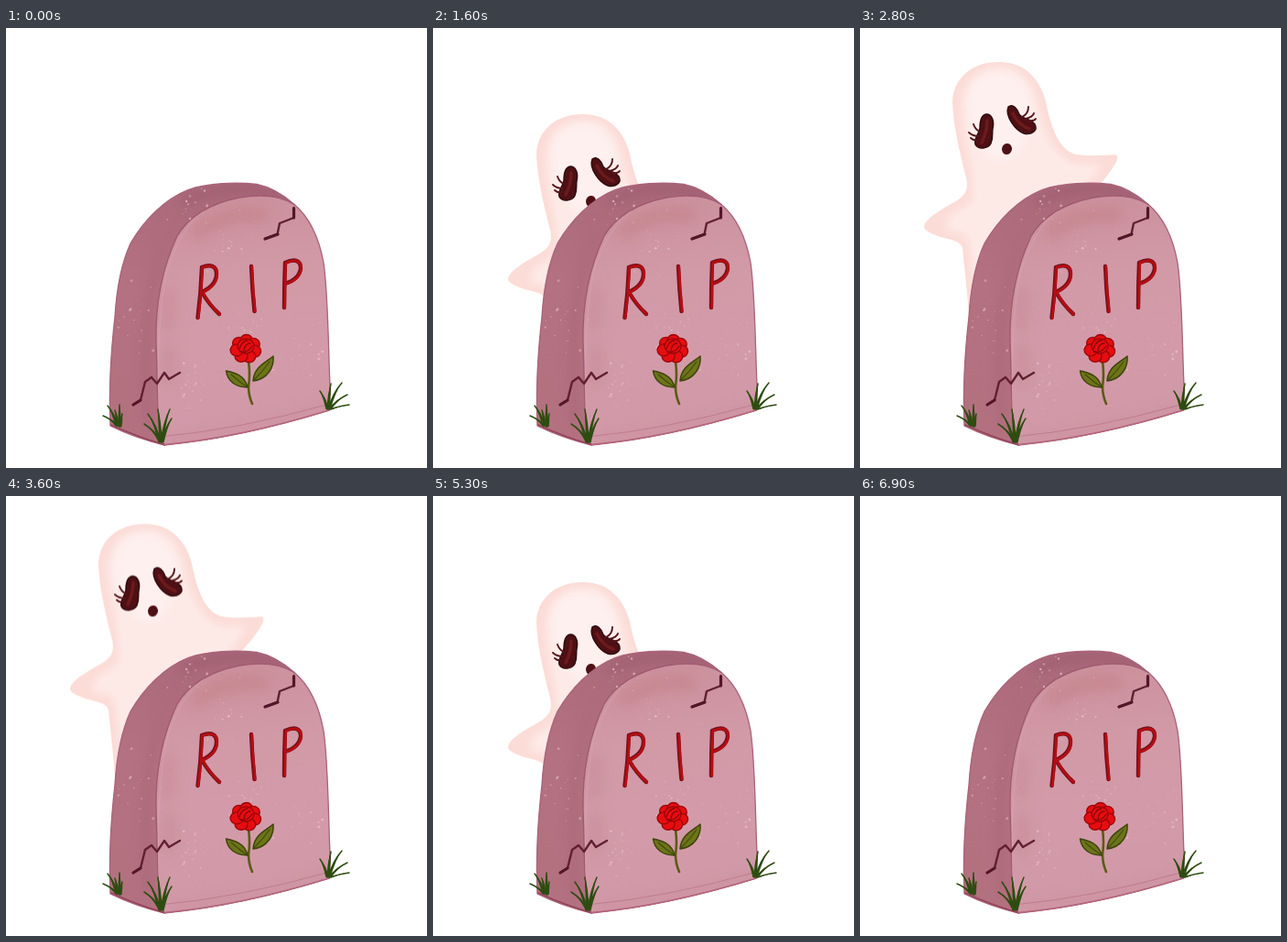
Animation, 460 px wide and 480 px high, one loop 7000 ms. Source, as an HTML page with a canvas:

```html
<!DOCTYPE html>
<html lang="en">
<head>
<meta charset="utf-8">
<title>Shy ghost</title>
<style>
  html, body { margin: 0; width: 100%; height: 100%; overflow: hidden; background: #fff; }
  canvas { display: block; }
</style>
</head>
<body>
<canvas id="stage" width="460" height="480"></canvas>
<script>
const W = 460, H = 480, STEP = 100, STEPS = 70;
const ctx = document.getElementById('stage').getContext('2d');

// Step, left arm tip x, head top y on the way up; the way down mirrors it.
const RISE = [
  [0, 126, 200], [3, 111, 160], [6, 101, 138.5], [8, 96, 129.5], [14, 86, 104],
  [16, 82, 94], [22, 70, 67], [28, 70, 37], [30, 70, 32], [32, 70, 30.5], [34, 70, 30]
];

function layer(draw) {
  const c = document.createElement('canvas');
  c.width = W;
  c.height = H;
  const g = c.getContext('2d');
  g.lineCap = g.lineJoin = 'round';
  draw(g);
  return c;
}

function fill(g, d, color) {
  g.fillStyle = color;
  g.fill(new Path2D(d));
}

function line(g, d, color, width) {
  g.strokeStyle = color;
  g.lineWidth = width;
  g.stroke(new Path2D(d));
}

function gradient(g, x0, y0, x1, y1, ...colors) {
  const grad = g.createLinearGradient(x0, y0, x1, y1);
  colors.forEach((c, i) => grad.addColorStop(i / (colors.length - 1), c));
  return grad;
}

// Draws inside a shape with soft edges.
function soft(g, shape, blur, draw) {
  g.save();
  g.clip(new Path2D(shape));
  g.filter = `blur(${blur}px)`;
  draw();
  g.restore();
}

function random(seed) {
  return () => (seed = seed * 16807 % 2147483647) / 2147483647;
}

function drawGhost(g) {
  const body = 'M70 217 C71 207 91 197 103 190 C115 183 119 177 116 163 ' +
    'C109 137 102 106 101 82 C101 55 122 37 152 37 C181 37 197 57 203 80 ' +
    'C208 105 216 133 236 138 C250 140 264 139 279 138 Q283 140 280 146 ' +
    'C273 159 263 170 250 184 L230 312 L119 312 C117 286 114 262 112 240 ' +
    'C110 232 99 231 88 228 Q70 222 70 217Z';
  fill(g, body, '#fcdcd7');
  soft(g, body, 4, () => {
    fill(g, 'M111 88 C111 58 130 44 154 43 C179 43 190 63 195 86 ' +
      'C201 112 210 137 232 147 L264 149 L240 184 L220 312 L128 312 ' +
      'C123 270 122 240 116 225 L92 220 L99 204 L122 190 ' +
      'C128 160 111 120 111 88Z', '#fdeae7');
  });
  soft(g, body, 5, () => {
    fill(g, 'M119 78 C120 53 139 48 154 49 C174 50 184 65 187 84 ' +
      'C189 102 178 142 157 144 C134 145 117 110 119 78Z', '#fdf0ef');
  });

  const leftEye = 'M138 94 C144 94 147 101 145 110 C144 115 146 119 143 126 ' +
    'C140 132 129 133 126 127 C124 121 130 116 131 109 C131 103 132 95 138 94Z';
  const rightEye = 'M162 86 C167 82 172 88 174 94 C177 99 187 99 191 105 ' +
    'C195 112 187 117 179 115 C170 112 158 96 162 86Z';
  for (const eye of [leftEye, rightEye]) {
    fill(g, eye, '#4d1014');
    line(g, eye, '#31090c', 1.4);
  }
  line(g, 'M139 101 Q139 113 133 125 M167 93 Q173 106 185 110', '#6d1a1c', 3.5);
  line(g, 'M131 113 Q126 111 124 105 M130 118 Q123 118 119 114 M129 122 Q124 123 121 120',
    '#541519', 1.9);
  line(g, 'M177 97 Q184 94 184 86 M181 99 Q189 97 190 93 M184 101 Q190 102 192 99',
    '#541519', 1.9);
  g.beginPath();
  g.ellipse(160.5, 132, 5.5, 6, 0.2, 0, 7);
  g.fillStyle = '#4f1014';
  g.fill();
}

function drawSpeckles(g, shape) {
  const rnd = random(4217);
  const spots = [[207, 388, 28], [262, 335, 25], [245, 240, 45], [320, 350, 40], [200, 195, 28], [145, 320, 45]];
  g.save();
  g.clip(new Path2D(shape));
  for (let i = 0; i < 170; i++) {
    const [x, y, r] = spots[i % spots.length];
    const a = rnd() * Math.PI * 2, d = rnd() * r;
    g.fillStyle = `rgba(242,208,215,${0.2 + rnd() * 0.45})`;
    g.beginPath();
    g.arc(x + Math.cos(a) * d, y + Math.sin(a) * d, 0.4 + rnd() ** 3 * 1.2, 0, 7);
    g.fill();
  }
  g.restore();
}

function drawLetters(g) {
  const letters = 'M214 261 Q213 289 209.5 316 M214 261 C224 257 230 260 230 268 ' +
    'C230 278 223 284 214 288 Q222 302 233 312 ' +
    'M268 260 Q269 285 271.5 309 ' +
    'M305 256 Q304 280 304 305 M305 256 C316 251 322 254 322 262 C321 271 314 276 305 279';
  line(g, letters, '#74101a', 4.4);
  g.save();
  g.translate(0.7, 0.3);
  line(g, letters, '#b80d12', 2.6);
  g.restore();
}

function drawRose(g) {
  line(g, 'M265 364 Q267 378 265 391 Q265 401 269 410', '#5c5a16', 2.6);
  const leaves = ['M264 392 C261 379 250 376 240.5 374 C242 386 252 392 264 392Z',
    'M270 385 C271 370 282 366 292 358 C293 370 286 383 270 385Z'];
  for (const leaf of leaves) {
    fill(g, leaf, '#6b7518');
    line(g, leaf, '#3f430e', 1.5);
  }
  line(g, 'M246 378 Q255 386 264 392 M271 384 Q281 374 288 364', '#444810', 1.1);

  const petal = (x, y, rx, ry) => {
    g.beginPath();
    g.ellipse(x, y, rx, ry, 0, 0, 7);
    g.fillStyle = '#e60d10';
    g.fill();
    g.strokeStyle = '#9c060b';
    g.lineWidth = 1.4;
    g.stroke();
  };
  for (let i = 0; i < 7; i++) {
    const a = -2.4 + i * Math.PI * 2 / 7;
    petal(262 + Math.cos(a) * 10, 350 + Math.sin(a) * 9, 7, 6.5);
  }
  petal(262, 347, 9, 8);
  line(g, 'M255 350 Q258 341 264 341 M260 352 Q261 344 267 344 M256 353 Q264 355 269 347',
    '#8b060b', 1.3);
}

// Each blade: root x, root y, tip x, tip y.
function drawGrass(g, blades) {
  for (const [x, y, tx, ty] of blades) {
    const mx = x + (tx - x) * 0.35, my = y + (ty - y) * 0.65;
    fill(g, `M${x - 1.6} ${y} Q${mx - 1.8} ${my} ${tx} ${ty} Q${mx + 2} ${my} ${x + 1.6} ${y}Z`, '#2f4d12');
    line(g, `M${x} ${y} Q${mx} ${my} ${tx} ${ty}`, '#2f4d12', 1.5);
  }
}

function drawStone(g) {
  const rightSide = 'C331 206 342 229 347 256 C352 290 352 345 354 390 L353.5 417 ' +
    'C305 432 240 449 173 455';
  const whole = 'M114 434 C112 390 115 350 119 315 C121 282 126 257 136 235 ' +
    'C150 211 172 187 199 176.5 C221 169 251 168 274 170.5 C291 174 303 182 315 192.5 ' +
    rightSide + ' Q140 447 114 434Z';
  const inner = 'M173 455 C164 435 166 390 164 343 C163 299 171 261 187 227 ' +
    'C200 205 225 191 255 185 C280 181 300 183 315 192.5 ';
  const front = inner + rightSide + 'Z';
  fill(g, whole, gradient(g, 130, 430, 240, 172, '#b37180', '#b37181', '#a96879'));
  soft(g, whole, 5, () => {
    line(g, 'M196 188 Q230 173 270 176 L300 184', '#a15f73', 8);
    line(g, 'M155 428 C151 350 152 270 181 218', '#ae6b7b', 12);
  });
  fill(g, front, gradient(g, 230, 190, 260, 440, '#cb919d', '#d299a7', '#d39ba9', '#d199a7'));
  soft(g, front, 7, () => {
    line(g, 'M210 222 Q238 200 280 204', '#c6868e', 14);
    line(g, 'M176 325 L177 290 M178 385 L178 352', '#ca909e', 16);
    line(g, 'M182 449 Q270 440 350 414', '#ca8d9c', 6);
  });
  line(g, whole, '#a9637a', 1.3);
  line(g, inner, '#a05a71', 1.4);
  line(g, 'M167 420 Q164 318 176 264 Q191 218 216 200', 'rgba(219,172,184,.45)', 1);
  line(g, 'M115 433 Q143 446 173 454.5', '#95455b', 1.6);
  line(g, 'M173 454.5 Q255 447 353 417', '#b5667c', 1.4);
  line(g, 'M168 446 Q255 438 350 411', 'rgba(166,88,110,.4)', 1);
  drawSpeckles(g, whole);

  line(g, 'M314.5 196 L314.5 207 L299 213 L296.5 225 L283 230 ' +
    'M139 411 L147 406 L152 386 L159 381 L165 388 L173 376 L178 383 L190 376', '#602031', 2.4);
  line(g, 'M314.5 197 L314.5 207 M297 225 L283 230 M139 411 L147 406', '#54162a', 3.2);

  drawLetters(g);
  drawRose(g);
  drawGrass(g, [
    [121, 434, 106, 423], [121, 434, 111, 412], [122, 434, 119, 417], [124, 435, 124, 411], [125, 435, 127, 421],
    [168, 451, 151, 432], [168, 452, 155, 421], [169, 452, 166, 416], [170, 452, 179, 416], [171, 452, 181, 426],
    [351, 416, 343, 396], [352, 416, 355, 388], [353, 416, 367, 387], [354, 416, 373, 400], [355, 416, 375, 411]
  ]);
}

const ghost = layer(drawGhost), stone = layer(drawStone);

function ghostAt(step) {
  const i = RISE.findIndex(k => k[0] >= step);
  if (i === 0) return RISE[0].slice(1);
  const [s0, x0, y0] = RISE[i - 1], [s1, x1, y1] = RISE[i];
  const p = (step - s0) / (s1 - s0);
  return [x0 + (x1 - x0) * p, y0 + (y1 - y0) * p];
}

function render(step) {
  let s = Math.min(step, STEPS - 1 - step);
  if (s >= 30) s -= s % 2; // slower steps at the top
  const [x, y] = ghostAt(s);
  ctx.fillStyle = '#fff';
  ctx.fillRect(0, 0, W, H);
  ctx.save();
  ctx.beginPath();
  ctx.rect(0, 0, W, 345);
  ctx.clip();
  if (s > 0) ctx.drawImage(ghost, x - 70, y - 37);
  ctx.restore();
  ctx.drawImage(stone, 0, 0);
}

const start = performance.now();
let shown = -1;

function tick() {
  const step = Math.floor((performance.now() - start) / STEP) % STEPS;
  if (step !== shown) render(shown = step);
  requestAnimationFrame(tick);
}
tick();
</script>
</body>
</html>
```
